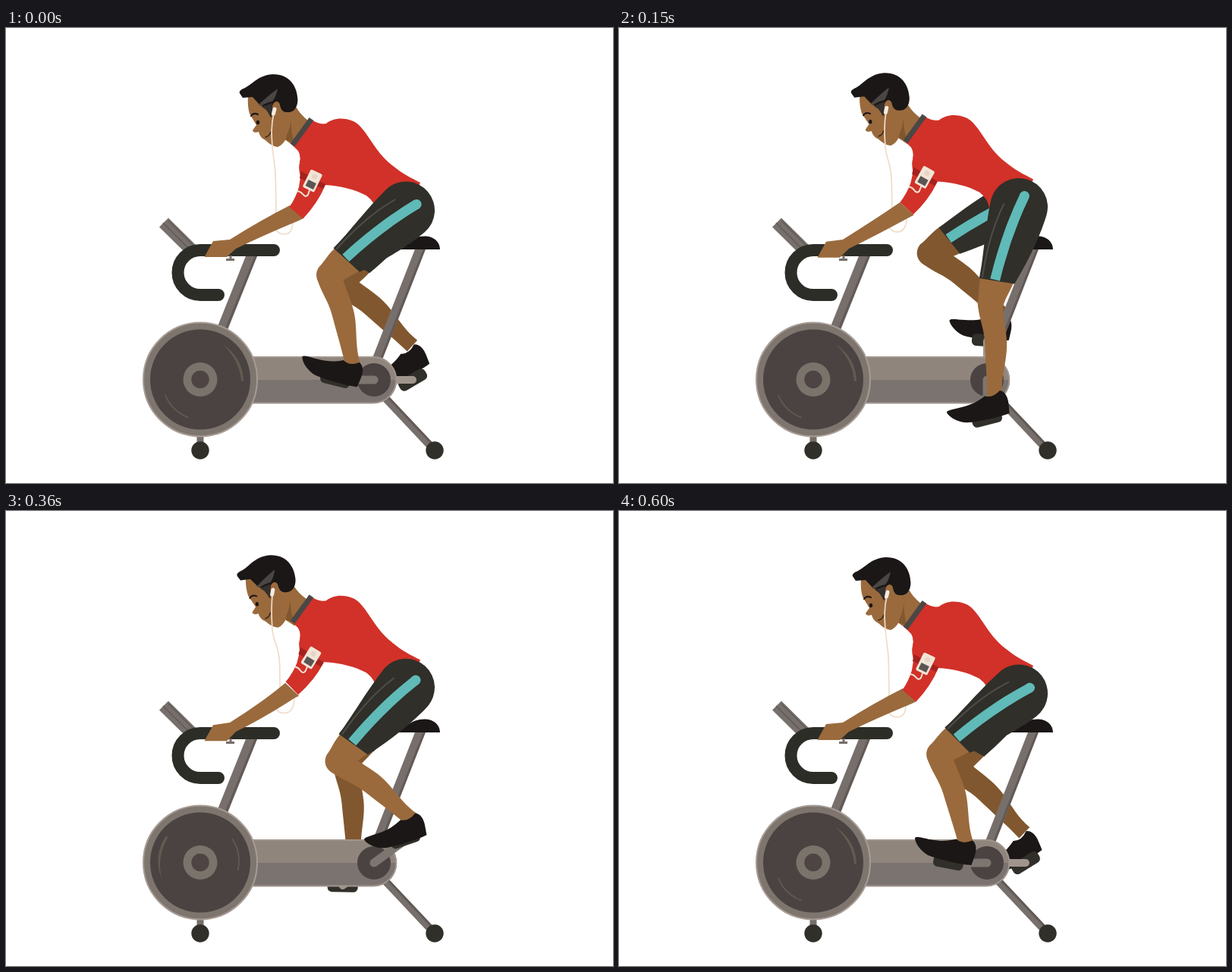
Recreate the animation shown at these times as an HTML page. Size 800x600 px, loop 630 ms.

```html
<!DOCTYPE html>
<html lang="en">
<head>
<meta charset="utf-8">
<title>Exercise bike</title>
<style>
  html, body { margin: 0; width: 100%; height: 100%; overflow: hidden; background: #fff; }
  svg { display: block; width: 100vw; height: 100vh; }
  .line { fill: none; stroke-linecap: round; stroke-linejoin: round; }
  .tube { fill: none; stroke: #776f6b; }
  .shade { fill: none; stroke: #625a57; stroke-width: 3; }
  .skin { fill: #9a6a3d; }
  .dark { fill: #302f29; }
  .shoe { fill: #1b1716; }
  .red { fill: #d13128; }
  .cord { stroke: #efdcc8; stroke-width: 1.7; }
  .far .skin { fill: #81572f; }
</style>
</head>
<body>
<svg viewBox="0 0 800 600" xmlns="http://www.w3.org/2000/svg">
  <g id="farLeg" class="far"></g>
  <g id="farPedal"><rect class="dark" x="-20" y="-8" width="40" height="16" rx="6"/></g>
  <path id="farArm" class="line" d="M0 0H51" stroke="#a0958d" stroke-width="10"/>

  <g id="frame">
    <path class="tube" stroke-width="10" d="M498 486L563 555"/>
    <path class="shade" d="M501 484L566 553"/>
    <path class="tube" stroke-width="13" d="M547 289L488 440"/>
    <path class="shade" d="M552 290L493 440"/>
    <path class="tube" stroke-width="14" d="M325 297L283 402"/>
    <path class="shade" d="M330 299L288 402"/>
    <path class="tube" stroke-width="9" d="M256 536V552"/>
    <circle class="dark" cx="565" cy="557" r="11.7"/>
    <circle class="dark" cx="256" cy="557" r="11.7"/>
    <path fill="#8f857c" d="M256 433H484A31 31 0 0 1 515 464H256Z"/>
    <path fill="#7b7370" d="M256 495H484A31 31 0 0 0 515 464H256Z"/>
    <path fill="none" stroke="#a0958d" stroke-width="2" d="M256 434H484A30 30 0 0 1 484 494.500H256"/>
    <circle cx="485" cy="464" r="22" fill="#4a4342"/>
    <g transform="translate(256 463.500)">
      <circle r="75" fill="#7d756e" stroke="#a79c95" stroke-width="2"/>
      <circle r="66" fill="#4a4342"/>
      <g id="spin">
        <path fill="#625c51" d="M29 -47Q56 -29 57 2L54 2Q52 -26 29 -47Z"/>
        <path class="line" stroke="#625c51" stroke-width="1.600" d="M-46 21Q-37 42 -16 50"/>
      </g>
      <circle r="22.500" fill="#7a736b"/>
      <circle r="11.700" fill="#4d4443"/>
    </g>
    <path class="tube" stroke-width="17" d="M208 256.500L246 294"/>
    <path class="shade" d="M207 257L244 294M214 254L250 290" style="stroke-width:1.600"/>
    <path class="line" stroke="#2c2d27" stroke-width="16" d="M353 293H256A29.500 29.500 0 0 0 256 352H280"/>
    <path class="tube" stroke-width="3" d="M290 305.500H301M296 300V306"/>
    <path class="shoe" d="M512 292C526 287 533 274 553 274.500C565 275 572 283 572 292Z"/>
  </g>

  <path id="nearArm" class="line" d="M0 0H51" stroke="#7d756f" stroke-width="11"/>
  <g id="nearPedal"><rect class="dark" x="-20" y="-7.500" width="40" height="15" rx="6"/></g>

  <g id="head">
    <path class="skin" d="M362 104L383 105Q387 113 398 122L380 156L366 146Z"/>
    <path fill="#81572f" d="M376 121Q373 140 366 146L380 152Q375 138 376 121Z"/>
    <path class="skin" d="M319 90Q318 103 321 113L330 128Q327 132 325 135Q326 139 333 137Q335 145 342 148Q350 156 358 157Q365 154 369 146L376 108L350 84Z"/>
    <path class="shoe" d="M308 86C307 83 310 81 315 79C326 73 333 62 352 61C374 61 384 77 384.500 95C384 108 377 112 369 111C362 110 362 104 360 99Q354 94 351 105L349 118L346 112L341 105L334 101L325 91L312 92Z"/>
    <path fill="#4a4644" d="M333 101Q347 88 358 80Q356 91 351 97Q344 98 336 103Z"/>
    <path fill="#33302d" d="M337 104L351 99L350 118L343 108Z"/>
    <path class="skin" d="M351 107C350 96 360 94 361 102C361 109 357 112 353 112Z"/>
    <ellipse class="shoe" cx="332" cy="124.500" rx="2.200" ry="2.800"/>
    <path class="line" stroke="#1b1716" stroke-width="2" d="M323 116Q326 111 332 114"/>
    <path class="line" stroke="#3a2717" stroke-width="1.500" d="M342 144Q347 143 349 137"/>
  </g>
  <path id="cord" class="line cord"/>
  <path id="bud" class="line" stroke="#f4ece4" stroke-width="5" d="M354 107L352.500 113"/>
  <path id="forearm" class="skin"/>

  <g id="torso">
    <path class="red" d="M403 121Q413 128 422 126C430 119 444 117 458 123C474 131 483 158 504 177C520 191 532 197 546 204L530 240L488 243Q487 230 475 221C460 213 441 208 420 207L388 196Q385 184 387 178Q389 168 385 162L377 154Z"/>
    <path fill="none" stroke="#4a4746" stroke-width="7" d="M402.500 120L377.500 154.500"/>
    <g id="sleeve">
      <path class="red" d="M387 175Q390 190 386 210Q382 224 373.500 236L391.500 251.500Q411 231 421 207L424 180Z"/>
      <path fill="#a3221e" d="M389 189L421 206L418 212L387 198Z"/>
      <path class="line" stroke="#f0e2d3" stroke-width="2" d="M384 215Q389 216 391 219Q395 224 398 220L400 214"/>
      <g transform="translate(404 201.500) rotate(26)">
        <rect x="-8.500" y="-13" width="17" height="26" rx="2" fill="#f2e5d7"/>
        <rect x="-5.500" y="1" width="11.500" height="9" fill="#5b5653"/>
        <circle cx="0" cy="-6" r="3.500" fill="#e6d5c4"/>
      </g>
    </g>
  </g>
  <g id="nearLeg"></g>
</svg>
<script>
const LOOP = 630, STEP = 30, TURN = 600;
const THIGH = 132, SHIN = 121.5;
const HUB = { x: 485, y: 464 };
const RAD = Math.PI / 180;
const $ = id => document.getElementById(id);
const place = (el, x, y, deg = 0) =>
  el.setAttribute('transform', `translate(${x.toFixed(2)} ${y.toFixed(2)}) rotate(${deg.toFixed(2)})`);

// time in the pedal turn, ankle x, ankle y, foot pitch
const STRIDE = [
  [10, 457, 443, 14],
  [69, 461, 468, 0],
  [157, 495, 484, -14],
  [275, 529, 446, -33],
  [364, 533, 405, -19],
  [452, 506, 388, 3],
  [530, 466, 402, 5],
  [575, 453, 421, 6],
  [600, 457, 437, 11]
];

const NEAR_SHORTS = 'M-38 0A38 38 0 0 1 38 0C38 30 31 70 23 99L-23.500 105C-26 75 -35 40 -38 0Z';
const FAR_SHORTS = 'M-25 0H32C36 30 29 70 22 99L-22 104C-24 75 -27 40 -25 0Z';

function buildLeg(id, shorts, stripe, fold) {
  $(id).innerHTML = `
    <g><path class="skin" d="M-17 0C-16 22 -10 32 -10 52C-10 80 -9 100 -10 125H10C8 98 19 78 19 52C19 34 15 18 16 -3Z"/></g>
    <g>
      <path class="skin" d="M-22 96C-23 112 -19 120 -17 132A17 17 0 0 0 17 132C17 118 21 108 22 94Z"/>
      <path class="dark" d="${shorts}"/>
      ${fold}
      <path fill="none" stroke="#60bab8" stroke-width="13" d="${stripe}"/>
    </g>
    <g><path class="shoe" d="M-67 7C-66 4 -58 5 -46 5C-32 5 -24 3 -13 -2Q-4 4 8 -4C15 -1 16 8 15 15L13 28C2 30 -32 29 -46 26C-57 22 -65 14 -67 7Z"/></g>`;
  const [shin, thigh, shoe] = $(id).children;
  return { shin, thigh, shoe };
}

const near = buildLeg('nearLeg', NEAR_SHORTS, 'M3 -16Q-6 40 -3 101',
  '<circle cx="3" cy="-16" r="6.5" fill="#60bab8"/>' +
  '<path class="line" stroke="#4e4d47" stroke-width="2" d="M-20 2Q-28 45 -20 102"/>');
const far = buildLeg('farLeg', FAR_SHORTS, 'M0 20Q-4 60 -3 101', '');

// Smooth cyclic curve through the stride table.
function stride(time) {
  const n = STRIDE.length;
  let t = ((time % TURN) + TURN) % TURN;
  if (t < STRIDE[0][0]) t += TURN;
  const key = i => {
    const row = STRIDE[(i + n) % n];
    return [row[0] + Math.floor(i / n) * TURN, ...row.slice(1)];
  };
  let i = 0;
  while (i < n - 1 && key(i + 1)[0] <= t) i++;
  const [a, b, c, d] = [i - 1, i, i + 1, i + 2].map(key);
  const h = c[0] - b[0], s = (t - b[0]) / h;
  return [1, 2, 3].map(j => {
    const m0 = h * (c[j] - a[j]) / (c[0] - a[0]);
    const m1 = h * (d[j] - b[j]) / (d[0] - b[0]);
    return b[j] * (1 + 2 * s) * (1 - s) ** 2 + m0 * s * (1 - s) ** 2
      + c[j] * s * s * (3 - 2 * s) + m1 * s * s * (s - 1);
  });
}

function poseLeg(leg, hx, hy, ax, ay, pitch, drop) {
  const dx = ax - hx, dy = ay - hy;
  const d = Math.min(Math.hypot(dx, dy), THIGH + SHIN - 0.1);
  const bend = Math.acos((THIGH ** 2 + d * d - SHIN ** 2) / (2 * THIGH * d));
  const swing = Math.atan2(-dx, dy) + bend;
  const kx = hx - THIGH * Math.sin(swing), ky = hy + THIGH * Math.cos(swing);
  place(leg.thigh, hx, hy, swing / RAD);
  place(leg.shin, kx, ky, Math.atan2(kx - ax, ay - ky) / RAD);
  place(leg.shoe, ax, ay + drop, pitch);
}

function poseCrank(side, deg, pitch) {
  place($(side + 'Arm'), HUB.x, HUB.y, deg);
  place($(side + 'Pedal'), HUB.x + 51 * Math.cos(deg * RAD), HUB.y + 52 * Math.sin(deg * RAD), pitch);
}

function poseBody(k) {
  const lift = 8.5 * k;
  place($('torso'), 0, -lift);
  $('sleeve').setAttribute('transform', `rotate(${5.7 * k} 405 180)`);
  const lean = `translate(${-0.5 * k} ${-1.5 * k}) rotate(${-3.6 * k} 326 136)`;
  $('head').setAttribute('transform', lean);
  $('bud').setAttribute('transform', lean);

  const ex = 382 - 6.5 * k, ey = 243 - 8 * k, hand = 1.5 * k;
  $('forearm').setAttribute('d',
    `M273 ${281 + hand}L261.500 ${302 + hand}L291 ${302 + hand}L303 291` +
    `Q340 273 ${ex + 4} ${ey + 11}L${ex + 10} ${ey + 8}L${ex - 8} ${ey - 9}Q338 252 295 279Z`);

  const sag = 6 * Math.sqrt(k), up = 6 * k;
  $('cord').setAttribute('d',
    `M${353 - 2 * k} ${112 - 3 * k}C349 130 350 142 351 156C352 174 ${355 + sag} 178 ${355 + sag} 206` +
    `L${355.5 + sag} 242C350 ${262 - up} 356 ${272 - up} 367 ${272 - up}` +
    `C377 ${272 - up} ${379 + 2 * k} ${262 - up} ${378 + 2 * k} ${245 - up}`);
}

function draw(t) {
  const step = t / STEP;
  const k = (1 - Math.cos(2 * Math.PI * (t + 15) / LOOP)) / 2;
  const hipY = 240.5 - 8.5 * k;
  const time = 10 + t * 590 / 600;
  const [nx, ny, np] = stride(time);
  const [fx, fy, fp] = stride(time + TURN / 2);

  place($('spin'), 0, 0, -72 * step);
  poseCrank('near', 180 - 18 * step, np);
  poseCrank('far', -18 * step, fp);
  poseLeg(near, 527, hipY, nx, ny, np, 0);
  poseLeg(far, 521, hipY - 10, fx - 1, fy - 13, fp, 8);
  poseBody(k);
}

const start = performance.now();
function tick() {
  const t = (performance.now() - start) % LOOP;
  draw(Math.floor(t / STEP) * STEP);
  requestAnimationFrame(tick);
}
tick();
</script>
</body>
</html>
```
